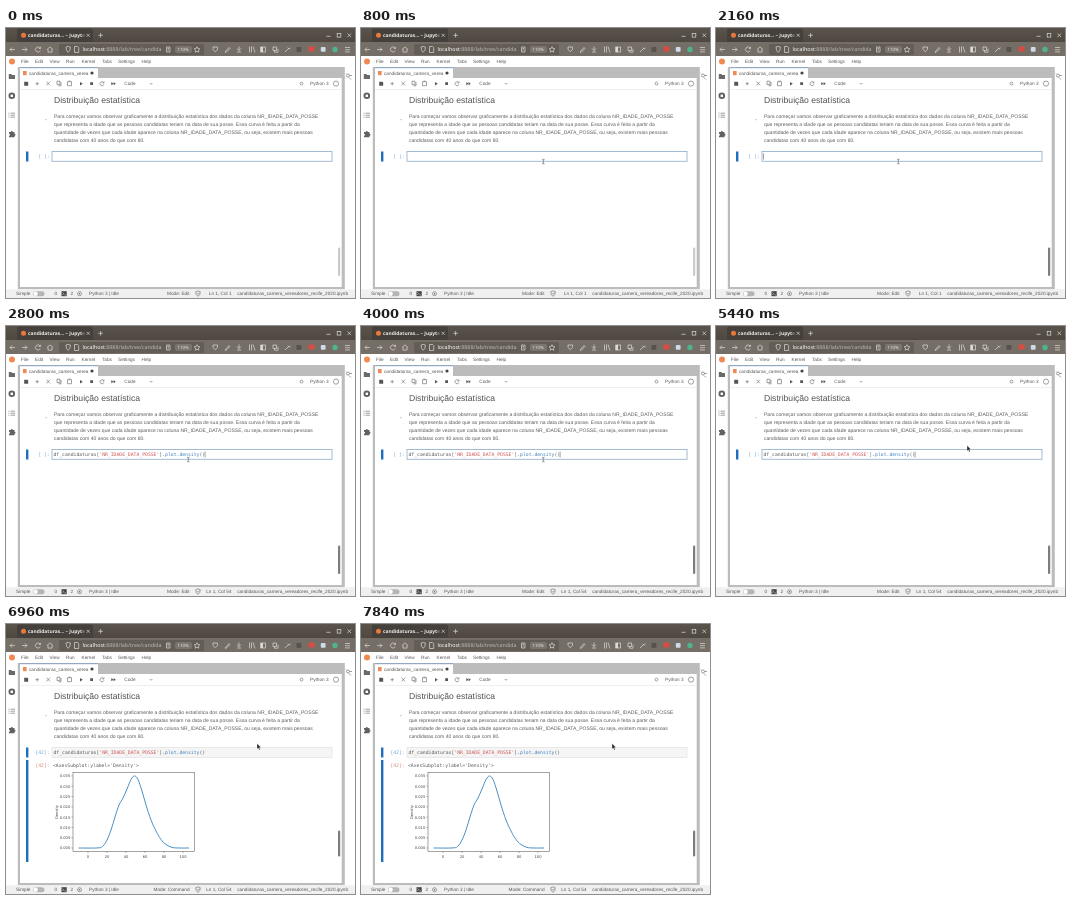
These frames come from a looping animation (349 by 270 pixels, 8000 ms). An HTML page:

```html
<!DOCTYPE html>
<html lang="pt">
<head>
<meta charset="utf-8">
<title>Distribuição estatística</title>
<style>
html, body { margin: 0; width: 100%; height: 100%; overflow: hidden; background: #fff; }
svg { display: block; width: 349px; height: 270px; }
text { font: 4.7px "Liberation Sans", Arial, sans-serif; fill: #555; text-rendering: geometricPrecision; white-space: pre; }
.ui text { font-family: "Noto Sans", sans-serif; fill: #eeece8; }
.ui .dim { fill: #bdb8b0; }
.para text { font-size: 5.04px; fill: #5c5c5c; }
.code text { font: 4.75px "DejaVu Sans Mono", monospace; fill: #5a5a5a; }
.code .in { fill: #6aa5d8; }
.code .out { fill: #d08570; }
.code .str { fill: #cc5555; }
.code .attr { fill: #3f80bf; }
.plot text { font: 3.7px "DejaVu Sans", sans-serif; fill: #444; }
.line { fill: none; stroke: #777; stroke-width: .7; }
.ui .line { stroke: #dedbd5; }
.end { text-anchor: end; }
.mid { text-anchor: middle; }
</style>
</head>
<body>
<svg viewBox="0 0 349 270">
  <defs>
    <linearGradient id="bar" x2="0" y2="1">
      <stop stop-color="#5a544c"/>
      <stop offset="1" stop-color="#4e4841"/>
    </linearGradient>
  </defs>
  <rect width="349" height="270" fill="#fff"/>

  <!-- browser window -->
  <g class="ui">
    <rect width="349" height="14" fill="url(#bar)"/>
    <rect y="14" width="349" height="14" fill="#756e66"/>
    <path d="M11 14V2.500a2 2 0 0 1 2-2H85a2 2 0 0 1 2 2V14z" fill="#45403b"/>
    <circle cx="17.500" cy="7.300" r="2.500" fill="#e8793a"/>
    <text x="22" y="9" style="font-size:4.900px;font-weight:600">candidaturas... – Jupyt<tspan fill="#8a857e">e</tspan></text>
    <path class="line" d="M80.700 5.800l3 3m0-3l-3 3M92.300 7.300h4.600m-2.300-2.300v4.600M320.500 8.300h4M341.500 5.500l3.600 3.600m0-3.600l-3.600 3.600"/>
    <rect class="line" x="331.200" y="5.500" width="3.600" height="3.600"/>

    <path class="line" d="M9 21.500H4l2-2m-2 2l2 2M16 21.500h5l-2-2m2 2l-2 2M34 20a2.500 2.500 0 1 0 .3 2.500M34.500 18.800v1.700h-1.700M41 21.500l3-2.600 3 2.600m-5-.4v3h4v-3"/>
    <rect x="53" y="16" width="145" height="11" rx="1.500" fill="#635d56"/>
    <path class="line" d="M60 19l2.200-.6 2.200.6q0 4-2.200 5.300-2.200-1.300-2.200-5.300zM68.500 18.500h3.200l1 1v5h-4.200zM160.500 19h3.500v5h-3.500zm1 1.500h1.500m-1.500 1.500h1.500"/>
    <text x="76.500" y="23.300" class="dim" style="font-size:5.300px"><tspan fill="#fff" font-weight="500">localhost</tspan>:8888/lab/tree/candida</text>
    <rect x="169" y="18" width="17" height="7" rx="2" fill="#7b756d"/>
    <text x="177" y="23.200" class="mid" style="font-size:4.400px">110%</text>
    <path class="line" d="M191 18.700l.9 1.900 2 .2-1.500 1.400.4 2-1.800-1-1.800 1 .4-2-1.500-1.400 2-.2z"/>
    <path class="line" d="M207 19h4.500v2.500l-2.200 2.200-2.300-2.200zM219 24l4-4.500 1 1-4 4zM233 18.500v4m-2-2l2 2 2-2m-4 3.500h4M243.500 18.500v6m2-6v6m1.500-6l2 6M254.500 19h5v5h-5zM267 19h3.500v3.500H267zm1.500 3.500v1.700h3.500v-3.500M279 24l3.500-3.500m-.8-.8l1.600 1.600 1-1.600M339 19.500h5m-5 2.200h5m-5 2.200h5"/>
    <rect x="255" y="19" width="2" height="5" fill="#dedbd5"/>
    <rect x="290.500" y="19" width="4.800" height="4.800" fill="#56524d"/>
    <rect x="302.500" y="18.500" width="6" height="5" rx="1" fill="#d94b43"/>
    <rect x="314.800" y="19" width="4.800" height="4.800" rx="1" fill="#cfdbe8"/>
    <circle cx="329" cy="21.500" r="2.700" fill="#4fb38c"/>
  </g>

  <!-- menu and side bars -->
  <circle cx="6" cy="33.500" r="3" fill="#f08a52"/>
  <g id="menu"></g>
  <rect x="11.800" y="39" width="327" height="222.300" fill="#bcbcbc"/>
  <rect x="14" y="50" width="321.700" height="209" fill="#fff"/>
  <path d="M2.800 46h2.500l.8 1H9v4H2.800z" fill="#6a6a6a"/>
  <circle cx="5.800" cy="67.800" r="3.300" fill="#616161"/>
  <rect x="4.600" y="66.600" width="2.400" height="2.400" fill="#fff"/>
  <path d="M2.500 85.200h1m1 0H9M2.500 87.200h1m1 0H9M2.500 89.200h1m1 0H9" stroke="#888" stroke-width=".8"/>
  <path d="M3 104h1.800a1 1 0 0 1 2 0H8.500v1.700a1 1 0 0 1 0 2v1.500H3v-1.500a1 1 0 0 0 0-2z" fill="#616161"/>
  <circle cx="342" cy="47.500" r="1.500" class="line"/>
  <path class="line" d="M343 49.500l2 2m-1.500-4h2.500M340 45.500l-.5-.5"/>

  <!-- document tab and toolbar -->
  <rect x="14" y="40" width="78" height="10.500" fill="#fff"/>
  <rect x="14" y="39.200" width="78" height="1" fill="#8ba3c0"/>
  <rect x="17" y="43" width="3.600" height="4.200" fill="#ee8a58"/>
  <text x="23" y="46.800">candidaturas_camera_verea</text>
  <circle cx="86" cy="45" r="1.600" fill="#444"/>
  <path class="line" d="M29.500 55.700h3.400m-1.700-1.700v3.400M40.500 53.700l3.500 3.700m0-3.700l-3.500 3.700M51 53.200h3v3.400h-3zm1.500 4.600H55V54M61.500 53.700h4v4h-4zm1-.6h2M97.700 54.700a2 2 0 1 0 .2 1.700M98 53.500v1.500h-1.500M143.800 55l1.300 1.300 1.300-1.300"/>
  <path d="M18.200 53.700h3.300l.7.700v3.300h-4zM74 54l2.800 1.700-2.800 1.700zM84.200 54.300h2.800v2.800h-2.800zM105.300 54.100l2.200 1.600-2.200 1.600zm2.300 0l2.200 1.600-2.200 1.600z" fill="#555"/>
  <text x="118.300" y="57.300">Code</text>
  <circle cx="295.500" cy="55.600" r="1.400" class="line"/>
  <text x="304" y="57.300">Python 3</text>
  <circle cx="330" cy="55.600" r="2.600" class="line"/>
  <path d="M14 61.500H335.500" stroke="#e4e4e4" stroke-width=".6"/>

  <!-- text cell -->
  <text x="48" y="75" style="font-size:8.600px;fill:#505050">Distribuição estatística</text>
  <g class="para">
    <text x="48" y="89.800">Para começar vamos observar graficamente a distribuição estatística dos dados da coluna NR_IDADE_DATA_POSSE</text>
    <text x="48" y="97.900">que representa a idade que as pessoas candidatas teriam na data de sua posse. Essa curva é feita a partir da</text>
    <text x="48" y="106">quantidade de vezes que cada idade aparece na coluna NR_IDADE_DATA_POSSE, ou seja, existem mais pessoas</text>
    <text x="48" y="114.100">candidatas com 40 anos do que com 80.</text>
  </g>
  <path d="M39 91.300l1 .8 1-.8" fill="none" stroke="#aaa" stroke-width=".6"/>

  <!-- code cell -->
  <rect x="20" y="123.500" width="2.400" height="10" fill="#1f6fbf"/>
  <rect id="cell" x="46" y="123.500" width="280" height="9.800"/>
  <g class="code">
    <text id="prompt" x="43.700" y="130" class="in end"></text>
    <text id="source" x="47.500" y="130">df_candidaturas[<tspan class="str">'NR_IDADE_DATA_POSSE'</tspan>].<tspan class="attr">plot</tspan>.<tspan class="attr">density</tspan>()</text>
  </g>
  <rect id="caret" y="125.500" width=".5" height="6" fill="#444"/>

  <!-- output -->
  <g id="output">
    <rect x="20" y="136" width="2.400" height="102" fill="#1f6fbf"/>
    <g class="code">
      <text x="43.700" y="143" class="out end">[42]:</text>
      <text x="47" y="143">&lt;AxesSubplot:ylabel='Density'&gt;</text>
    </g>
    <g class="plot">
      <rect x="67" y="148.500" width="121.500" height="79" fill="#fff" stroke="#666" stroke-width=".6"/>
      <g id="ticks"></g>
      <text class="mid" transform="translate(51.500 188) rotate(-90)">Density</text>
      <path id="curve" fill="none" stroke="#4a8fc4" stroke-width="1"/>
    </g>
  </g>

  <rect id="thumb" x="332" width="2.200" rx="1.100"/>

  <!-- status bar -->
  <rect y="261.300" width="349" height="8.700" fill="#f0f0f0"/>
  <text x="10" y="267.300">Simple</text>
  <rect x="27" y="263.300" width="11.500" height="5" rx="2.500" fill="#b5b5b5"/>
  <circle cx="29.600" cy="265.800" r="2.200" fill="#fff"/>
  <text x="48.500" y="267.300">0</text>
  <rect x="55.500" y="263.200" width="5.200" height="5" fill="#444"/>
  <path d="M56.500 264.500l1.200 1.200-1.200 1.200m2 0h1.300" fill="none" stroke="#fff" stroke-width=".6"/>
  <text x="64.500" y="267.300">2</text>
  <circle cx="73.500" cy="265.700" r="2" class="line"/>
  <circle cx="73.500" cy="265.700" r=".7" fill="#616161"/>
  <text x="83" y="267.300">Python 3 | Idle</text>
  <text id="mode" x="183.500" y="267.300" class="end"></text>
  <path class="line" d="M189.700 263.700l2.300-.8 2.300.8q0 3.400-2.300 4.700-2.300-1.300-2.300-4.700zm1.300 1.600l1 1 1.400-1.600"/>
  <text id="position" x="225.500" y="267.300" class="end"></text>
  <text x="342" y="267.300" class="end">candidaturas_camera_vereadores_recife_2020.ipynb</text>

  <!-- pointers -->
  <path id="beam" d="M181 131.300h.9l.4.400.4-.4h.9M182.300 131.700v3.700M181 135.800h.9l.4-.4.4.4h.9" fill="none" stroke="#555" stroke-width=".6"/>
  <path id="arrow" d="M0 0v5.600l1.300-1.200.9 2 1-.5-.9-1.900h1.800z" fill="#222" stroke="#fff" stroke-width=".35"/>
</svg>
<script>
const $ = id => document.getElementById(id);
const show = (id, on) => $(id).setAttribute('visibility', on ? 'visible' : 'hidden');
const set = (id, attrs) => Object.entries(attrs).forEach(([k, v]) => $(id).setAttribute(k, v));
const write = (id, s) => { if ($(id).textContent !== s) $(id).textContent = s; };
const label = (x, y, s, cls = '') => `<text x="${x}" y="${y}" class="${cls}">${s}</text>`;

const menu = { File: 15, Edit: 29, View: 43.5, Run: 60, Kernel: 75.5, Tabs: 96, Settings: 112, Help: 135.5 };
$('menu').innerHTML = Object.entries(menu).map(([s, x]) => label(x, 35.2, s)).join('');

const tick = d => `<path d="${d}" stroke="#666" stroke-width=".5"/>`;
let ticks = '';
for (let i = 0; i < 6; i++) {
  const x = 82 + 19 * i;
  ticks += tick(`M${x} 227.5v1.600`) + label(x, 233.6, i * 20, 'mid');
}
for (let i = 0; i < 8; i++) {
  const y = 224 - 10.3 * i;
  ticks += tick(`M67 ${y}h-1.600`) + label(64.3, y + 1.4, (i * .005).toFixed(3), 'end');
}
$('ticks').innerHTML = ticks;

// Catmull-Rom spline through a few points of the density
const pts = [[72.5, 224], [92, 223.9], [97, 222], [101, 216], [105, 206], [109, 193], [113, 181], [117, 174],
  [121, 165], [125, 155.5], [128.5, 152], [132, 155.5], [136, 167], [140, 181], [145, 196], [150, 207],
  [155, 215.5], [160, 220.5], [166, 223.4], [173, 224], [183, 224]];
const at = i => pts[Math.max(0, Math.min(pts.length - 1, i))];
let d = 'M' + pts[0];
for (let i = 0; i < pts.length - 1; i++) {
  const [a, b, c, e] = [at(i - 1), at(i), at(i + 1), at(i + 2)];
  d += `C${b.map((v, k) => v + (c[k] - a[k]) / 6)} ${c.map((v, k) => v - (e[k] - b[k]) / 6)} ${c}`;
}
$('curve').setAttribute('d', d);

const LOOP = 8000, ENTER = 800, FOCUS = 1600, PASTE = 2800, MOVE = 4800, RUN = 5600, DONE = 5760, BLINK = 530;

function draw(t) {
  const pasted = t >= PASTE, ran = t >= RUN, done = t >= DONE;
  show('source', pasted);
  show('output', done);
  write('prompt', done ? '[42]:' : ran ? '[*]:' : '[ ]:');
  write('mode', ran ? 'Mode: Command' : 'Mode: Edit');
  write('position', pasted ? 'Ln 1, Col 54' : 'Ln 1, Col 1');
  set('cell', ran ? { fill: '#f5f5f5', stroke: '#dcdcdc', 'stroke-width': .6 }
                  : { fill: '#fff', stroke: '#9ab6d0', 'stroke-width': .9 });
  set('thumb', { y: done ? 206.5 : 219.5, height: done ? 26 : 28.5, fill: t < FOCUS ? '#cacaca' : '#7d7d7d' });

  set('caret', { x: pasted ? 198.8 : 47.3 });
  show('caret', t >= FOCUS && !ran && Math.floor((t - PASTE) / BLINK) % 2 === 0);

  const p = Math.max(0, Math.min(1, (t - MOVE) / 240));
  const ease = p * p * (3 - 2 * p);
  show('beam', t >= ENTER && t < MOVE);
  show('arrow', t >= MOVE);
  set('arrow', { transform: `translate(${182 + 69 * ease} ${131 - 11.5 * ease})` });
}

const start = performance.now();
function frame() {
  draw((performance.now() - start) % LOOP);
  requestAnimationFrame(frame);
}
frame();
</script>
</body>
</html>
```
